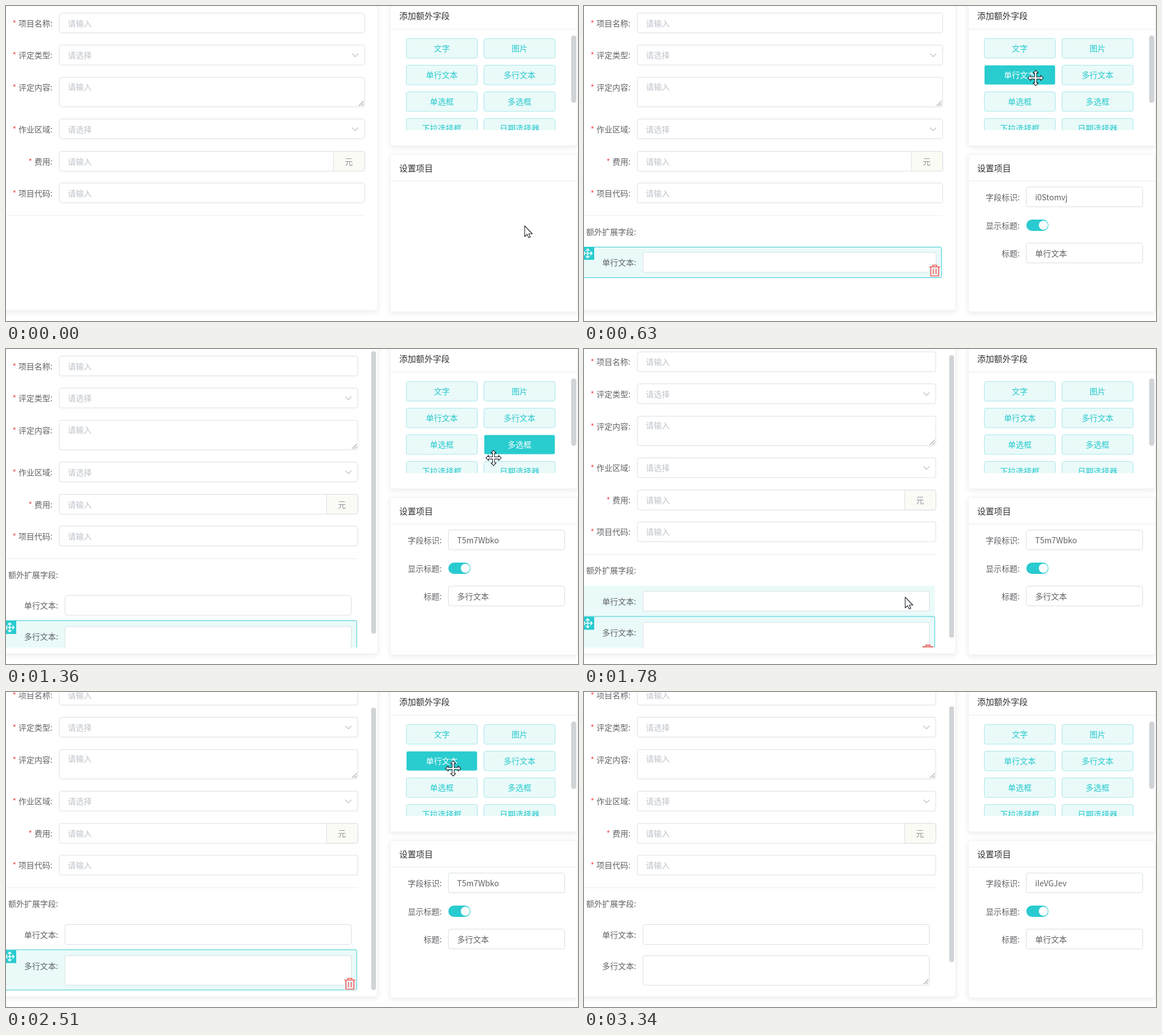
Write an HTML page that moves like this. It is 1008x556 px and loops after 4610 ms.

```html
<!DOCTYPE html>
<html lang="zh-CN">
<head>
<meta charset="utf-8">
<title>表单设计</title>
<style>
html, body { margin: 0; width: 100%; height: 100%; overflow: hidden; background: #fff; }
#stage { position: absolute; left: 0; top: 0; width: 1008px; height: 556px; overflow: hidden; }
.panel { position: absolute; box-sizing: border-box; background: #fff; border: 1px solid #f3f4f6; border-radius: 4px; box-shadow: 0 2px 10px rgba(55, 55, 25, .11); }
#side1, #side2 { left: 677px; width: 330px; }
#main { left: -20px; top: -20px; width: 675px; height: 558px; }
#side1 { top: -20px; height: 267px; }
#side2 { top: 262px; height: 278px; }
svg { position: absolute; left: 0; top: 0; }
text { font: 14px "Noto Sans CJK SC", "Noto Sans CJK", "Noto Sans", sans-serif; fill: #606266; white-space: pre; }
.hint { fill: #bcc2c9; }
.unit { fill: #909399; }
.head { font-size: 14.8px; fill: #303133; }
.star { fill: #f54848; }
.teal { fill: #26c8cc; }
.white { fill: #fff; }
.box { fill: #fff; stroke: #d8dfe4; }
.addon { fill: #fbfbf5; }
.line { stroke: #e9ebf0; }
.thumb { fill: #d0d4d6; }
.button { fill: #e9faf9; stroke: #a8e6ea; }
.button.on { fill: #29cccf; stroke: #d4f4f5; }
.block { fill: #e9faf9; }
.block.on { stroke: #35c9ce; }
.solid { fill: #29cbd0; }
.icon { fill: none; stroke-linecap: round; stroke-linejoin: round; }
.cursor { fill: #fff; stroke: #1d2029; stroke-width: 1.1; stroke-linejoin: round; }
</style>
</head>
<body>
<div id="stage">
  <div class="panel" id="main"></div>
  <div class="panel" id="side1"></div>
  <div class="panel" id="side2"></div>
  <svg width="1008" height="556" viewBox="0 0 1008 556">
    <defs>
      <clipPath id="formClip"><rect y="1" width="655" height="526"/></clipPath>
      <clipPath id="listClip"><rect x="678" y="42" width="330" height="177"/></clipPath>
    </defs>
    <g clip-path="url(#formClip)"><g id="form"></g></g>
    <g id="bar"></g>
    <g id="titles"></g>
    <g id="list" clip-path="url(#listClip)"></g>
    <g id="settings"></g>
    <g id="cursor"></g>
  </svg>
</div>
<script>
const LOOP = 4610;
const ADD_LINE = 630, ADD_AREA = 1160, ADD_LAST = 2850;
const SCROLL_START = 1740, SCROLL_END = 2100, SCROLL_MAX = 24.5;
const VIEW = 524;

const BUTTONS = ['文字', '图片', '单行文本', '多行文本', '单选框', '多选框', '下拉选择框', '日期选择器'];
const PICKED = [
  { at: ADD_LINE, id: 'i0Stomvj', title: '单行文本' },
  { at: ADD_AREA, id: 'T5m7Wbko', title: '多行文本' },
  { at: ADD_LAST, id: 'ileVGJev', title: '单行文本' }
];

// Pointer legs: each eases from wherever the last one ended.
const HOME = { x: 914, y: 388 };
const LEGS = [
  { from: 50, to: 530, x: 795, y: 127 },
  { from: ADD_LINE, to: 1050, x: 891, y: 133 },
  { from: ADD_AREA, to: 1360, x: 862, y: 190 },
  { from: 1360, to: 1780, x: 566, y: 438 },
  { from: 2030, to: 2510, x: 788, y: 135 },
  { from: 2900, to: 3300, x: 880, y: 582 }
];

const $ = id => document.getElementById(id);

function easeOut(t, from, to, power) {
  const u = Math.min(1, Math.max(0, (t - from) / (to - from)));
  return 1 - (1 - u) ** power;
}

const pointAt = t => LEGS.reduce((p, leg) => {
  const k = easeOut(t, leg.from, leg.to, 4);
  return { x: p.x + (leg.x - p.x) * k, y: p.y + (leg.y - p.y) * k };
}, HOME);

const scrollAt = t => SCROLL_MAX * easeOut(t, SCROLL_START, SCROLL_END, 3);

// Palette grid: the highlight reacts to the whole cell around a button.
const GRID = { x: 705.5, y: 57.5, dx: 137, dy: 47, w: 125, h: 34.5, gap: 6, bottom: 219 };
const buttonX = i => GRID.x + GRID.dx * (i % 2);
const buttonY = i => GRID.y + GRID.dy * (i >> 1);

function buttonAt({ x, y }) {
  const col = Math.floor((x - GRID.x + GRID.gap) / GRID.dx);
  const row = Math.floor((y - GRID.y + GRID.gap) / GRID.dy);
  return col < 0 || col > 1 || row < 0 || y > GRID.bottom ? -1 : row * 2 + col;
}

// Drawing helpers; text is placed by its vertical centre.
const text = (s, x, cy, cls = '', anchor = 'start') =>
  `<text class="${cls}" x="${x}" y="${cy + 5.2}" text-anchor="${anchor}">${s}</text>`;
const label = (s, right, cy) => text(s + ':', right, cy, '', 'end');
const rect = (x, y, w, h, cls, r = 0) =>
  `<rect class="${cls}" x="${x}" y="${y}" width="${w}" height="${h}" rx="${r}"/>`;
const box = (x, y, right, h) => rect(x, y, right - x, h, 'box', 3.5);
const line = (x1, x2, y) => `<line class="line" x1="${x1}" x2="${x2}" y1="${y}" y2="${y}"/>`;
const icon = (d, x, y, color, w) =>
  `<path class="icon" d="${d}" transform="translate(${x} ${y})" stroke="${color}" stroke-width="${w}"/>`;

const chevron = (right, cy) => icon('M-5 -2.5L0 2.5 5 -2.5', right - 16.5, cy, '#bcc2c9', 1.2);
const grip = (right, bottom) => icon('M-10 -2L-2 -10M-5.5 -2L-2 -5.5', right, bottom, '#6b6f73', 1);
const trash = (x, y) => rect(x - 10.5, y - 11, 21, 22, 'block', 2) +
  icon('M-9 -6.5H9M-3.5 -6.5V-9.5H3.5V-6.5M-7 -6.5V9.5H7V-6.5M-2.4 -2.5V5.5M2.4 -2.5V5.5', x, y, '#f65a5a', 1.7);

const turns = [0, 90, 180, 270];
const handle = y => rect(0, y, 18, 23, 'solid') + `<g transform="translate(6.5 ${y + 11.5})">` +
  turns.map(a => `<g transform="rotate(${a})">${icon('M0 0V-8M-2.8 -5.2L0 -8 2.8 -5.2', 0, 0, '#fff', 1.6)}</g>`).join('') + '</g>';

function required(name, cy) {
  const left = 78 - name.length * 14;
  return text('*', left - 10.5, cy, 'star') + label(name, 82, cy);
}

function block(top, h, right, selected, hovered) {
  if (!selected && !hovered) return '';
  return rect(-10, top + .5, right + 8, h, selected ? 'block on' : 'block', 2);
}

const ROWS = [
  { name: '项目名称', y: 12.5 },
  { name: '评定类型', y: 69, select: true },
  { name: '评定内容', y: 126, area: true },
  { name: '作业区域', y: 199.5, select: true },
  { name: '费用', y: 256.5, unit: '元' },
  { name: '项目代码', y: 312.5 }
];

function rowView({ name, y, select, area, unit }, right) {
  const h = area ? 52 : 35, cy = y + 18, cell = right - 55;
  let out = required(name, cy) + box(94, y, right, h);
  out += text(select ? '请选择' : '请输入', 109, area ? y + 16.5 : cy, 'hint');
  if (select) out += chevron(right, cy);
  if (area) out += grip(right, y + h);
  if (unit) {
    out += `<path class="box addon" d="M${cell} ${y}h51.5q3.5 0 3.5 3.5v28q0 3.5 -3.5 3.5h-51.5z"/>`;
    out += text(unit, cell + 27, cy, 'unit', 'middle');
  }
  return out;
}

function formView(t, { x, y }) {
  const right = t < ADD_AREA ? 632 : 620;
  let out = ROWS.map(row => rowView(row, right)).join('') + line(0, right, 370);
  if (t < ADD_LINE) return out;

  const lineOn = t < ADD_AREA, areaOn = !lineOn && t < ADD_LAST;
  const over = x < right && y > 425 && y < 479;
  out += text('额外扩展字段:', 4, 398.5) + block(425, 54, right, lineOn, over);
  out += label('单行文本', 92, 453) + box(104, 435, right - 11.5, 35);
  if (lineOn) return out + handle(425) + trash(right - 14, 467);

  out += block(479, 71, right, areaOn, false);
  out += label('多行文本', 92, 508) + box(104, 490, right - 11.5, 52) + grip(right - 11.5, 542);
  if (areaOn) out += handle(480) + trash(right - 14, 539.5);
  return out;
}

function barView(t, scroll) {
  if (t < ADD_AREA) return '';
  const total = VIEW + SCROLL_MAX + (t < ADD_LAST ? 0 : 57);
  return rect(643.5, 4 + scroll * VIEW / total, 8.5, VIEW * VIEW / total - 2, 'thumb', 4);
}

const listView = hover => BUTTONS.map((name, i) => {
  const x = buttonX(i), y = buttonY(i), on = i === hover;
  return rect(x, y, GRID.w, GRID.h, on ? 'button on' : 'button', 3) +
    text(name, x + GRID.w / 2, y + 17.5, on ? 'white' : 'teal', 'middle');
}).join('') + rect(996, 52, 9, 119, 'thumb', 4.5);

function settingsView(t) {
  const pick = PICKED.filter(p => p.at <= t).pop();
  if (!pick) return '';
  const field = (name, value, y) => label(name, 768, y + 18.5) + box(779.5, y, 984.5, 35) + text(value, 795, y + 18.5);
  return field('字段标识', pick.id, 319.5) + field('标题', pick.title, 418.5) +
    label('显示标题', 768, 387.5) + rect(779.5, 377, 39, 20, 'solid', 10) +
    '<circle cx="809.5" cy="387" r="8" fill="#fff"/>';
}

const ARROW = 'M0 0V19L4.3 15 7.2 21 10 19.7 7.3 14H13.5Z';
const ARM = [[0, -13.5], [4.6, -8.7], [1.8, -8.7], [1.8, -1.8], [8.7, -1.8], [8.7, -4.6]];
const MOVE = 'M' + turns.flatMap(a => ARM.map(([x, y]) => {
  const c = Math.round(Math.cos(a * Math.PI / 180)), s = Math.round(Math.sin(a * Math.PI / 180));
  return `${x * c - y * s} ${x * s + y * c}`;
})).join('L') + 'Z';

const shown = {};
function put(id, html) {
  if (shown[id] !== html) $(id).innerHTML = shown[id] = html;
}

function draw(t) {
  const p = pointAt(t), scroll = scrollAt(t), hover = buttonAt(p);
  const moving = hover >= 0 && p.y >= buttonY(hover);
  put('form', formView(t, { x: p.x, y: p.y + scroll }));
  $('form').setAttribute('transform', `translate(0 ${-scroll})`);
  put('bar', barView(t, scroll));
  put('list', listView(hover));
  put('settings', settingsView(t));
  put('cursor', `<path class="cursor" d="${moving ? MOVE : ARROW}"/>`);
  $('cursor').setAttribute('transform', `translate(${p.x} ${p.y})`);
}

put('titles', text('添加额外字段', 693, 18, 'head') + line(678, 1007, 41) +
  text('设置项目', 693, 286.5, 'head') + line(678, 1007, 309));

const start = performance.now();
function tick() {
  draw((performance.now() - start) % LOOP);
  requestAnimationFrame(tick);
}
tick();
</script>
</body>
</html>
```
